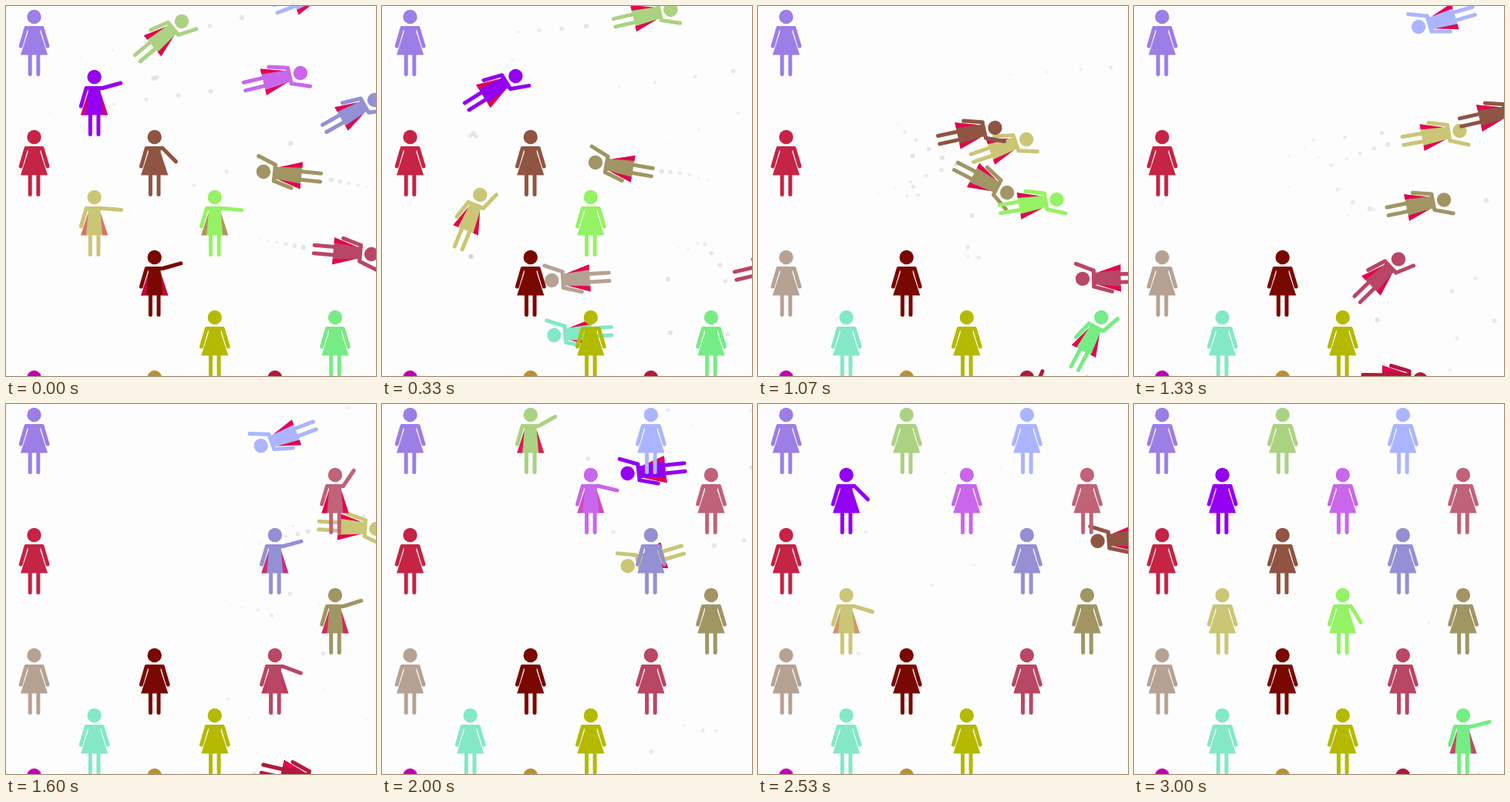
Recreate the animation shown at these times as an HTML page with a canvas. Size 480 by 480 pixels, loop 3070 ms.

```html
<!DOCTYPE html>
<html lang="en">
<head>
<meta charset="utf-8">
<title>Flying figures</title>
<style>
  html, body { margin: 0; width: 100%; height: 100%; overflow: hidden; background: #fefdfe; }
  canvas { display: block; width: 480px; height: 480px; }
</style>
</head>
<body>
<canvas id="stage" width="480" height="480"></canvas>
<script>
const ctx = document.getElementById('stage').getContext('2d');
const LOOP = 3070, STEPS = 46, STEP = LOOP / STEPS;
const RAISE = 350, LOWER = 300, PUFF_LIFE = 480;
const OUTSIDE = 590, EXIT_PACE = 1.6, ENTER_PACE = .9; // pace in ms per px
const LEAN = -6 * Math.PI / 180;

// Stands for leaving past the right edge and coming back from there.
const AWAY = 'away';
const at = (t, x, y) => ({ t, x, y });

// up: arm starts to rise; down: feet touch the ground; lift: arm height at the start;
// via: points the head passes between the two
const cast = [
  { color: '#9c7ee6' },
  { color: '#abd281', up: -540, down: 1920, via: [at(0, 228, 20), at(333, 374, 5), AWAY] },
  { color: '#abb5ff', down: 1700, via: [at(0, 420, -22), AWAY, at(1300, 385, 25), at(1600, 331, 54)] },

  { color: '#9300f2', up: -220, down: 2230, via: [at(333, 173, 91), AWAY, at(2000, 321, 90)] },
  { color: '#c966ec', down: 1830, via: [at(0, 382, 87), AWAY] },
  { color: '#c06278', down: 1576, via: [AWAY] },

  { color: '#c52444' },
  { color: '#8f5442', lift: .2, up: 430, down: 2690, via: [at(1067, 307, 158), AWAY, at(2533, 358, 176)] },
  { color: '#9390d4', down: 1490, via: [at(0, 478, 122), AWAY] },

  { color: '#cac675', up: -170, down: 2290, via: [at(333, 127, 245), at(1067, 348, 173), at(1600, 480, 162), at(1750, 455, 185), at(2000, 320, 210)] },
  { color: '#94f264', lift: .48, up: 420, down: 2736, via: [at(1067, 387, 251), AWAY] },
  { color: '#a09563', down: 1495, via: [at(0, 334, 215), at(333, 277, 203), at(700, 245, 190), at(1067, 323, 242)] },

  { color: '#b5a293', down: 650, via: [AWAY, at(333, 221, 356)] },
  { color: '#780800', lift: .63 },
  { color: '#b94664', down: 1414, via: [at(0, 474, 322), at(333, 531, 333), AWAY, at(1067, 422, 354)] },

  { color: '#83e8c5', down: 560, via: [AWAY, at(333, 224, 427)] },
  { color: '#b3ba00' },
  { color: '#76ec85', up: 560, down: 2890, via: [at(1067, 445, 404), AWAY] },

  { color: '#c300b8' },
  { color: '#b8922f' },
  { color: '#b3183c', up: 720, down: 2700, via: [at(1600, 405, 490), at(2000, 425, 507), AWAY] }
];

const clamp = v => Math.max(0, Math.min(1, v));
const smooth = v => (v = clamp(v), v * v * (3 - 2 * v));

// A point beyond the right edge, in line with home and the nearest visible point.
function outside(f, p, pace, rise) {
  return at(p.t + (OUTSIDE - p.x) * pace, OUTSIDE, p.y + (p.y - f.y) / 2 - rise);
}

function flightKeys(f) {
  const takeoff = f.up === undefined ? [] : [at(f.up + RAISE, f.x, f.y)];
  const stops = [...takeoff, ...f.via, at(f.down, f.x, f.y)];
  return stops.flatMap((p, i) => {
    if (p !== AWAY) return [p];
    const enter = outside(f, stops[i + 1], -ENTER_PACE, 0);
    return i ? [outside(f, stops[i - 1], EXIT_PACE, 25), enter] : [enter];
  });
}

// Three figures per row, odd rows shifted one column.
cast.forEach((f, i) => {
  const row = Math.floor(i / 3);
  f.x = 36.5 + 78.1 * (i % 3 * 2 + row % 2);
  f.y = 14 + 78 * row;
  if (f.via) f.keys = flightKeys(f);
});

// Speed at a key: at rest on the ground, else that of its neighbours.
function speed(f, i, axis) {
  const k = f.keys, end = k.length - 1;
  if (i === end || (i === 0 && f.up !== undefined)) return 0;
  const a = k[Math.max(0, i - 1)], b = k[i === end - 1 && i > 0 ? i : i + 1];
  return (b[axis] - a[axis]) / (b.t - a.t);
}

function along(f, t, axis) {
  const k = f.keys;
  if (t < k[0].t) return k[0][axis] + speed(f, 0, axis) * (t - k[0].t);
  let i = 0;
  while (i < k.length - 2 && t > k[i + 1].t) i++;
  const dt = k[i + 1].t - k[i].t, u = clamp((t - k[i].t) / dt), v = 1 - u;
  return v * v * (1 + 2 * u) * k[i][axis] + u * u * (3 - 2 * u) * k[i + 1][axis]
    + dt * u * v * (v * speed(f, i, axis) - u * speed(f, i + 1, axis));
}

function isFlying(f, t) {
  return !!f.keys && t < f.down && (f.up === undefined || t > f.up + RAISE);
}

function armLift(f, t) {
  const before = Math.max(0, (f.lift || 0) - t / LOWER);
  if (!f.keys) return before;
  const rise = f.up === undefined ? 1 : clamp((t - f.up) / RAISE);
  return Math.max(before, Math.min(rise, clamp(1 - (t - f.down) / LOWER)));
}

// In the air the head leads; near the ground the body swings upright.
function pose(f, t) {
  if (!isFlying(f, t)) return { x: f.x, y: f.y, turn: 0 };
  const move = axis => along(f, t + 2, axis) - along(f, t - 2, axis);
  const heading = Math.atan2(move('x'), -move('y')) + LEAN;
  const aloft = f.up === undefined ? 1 : smooth((t - f.up - RAISE - 80) / 190);
  const turn = heading * Math.min(aloft, smooth((f.down - t) / 110));
  return { x: along(f, t, 'x'), y: along(f, t, 'y'), turn };
}

function line(x1, y1, x2, y2) {
  ctx.beginPath();
  ctx.moveTo(x1, y1);
  ctx.lineTo(x2, y2);
  ctx.stroke();
}

function shape(...pts) {
  ctx.beginPath();
  pts.forEach(([x, y]) => ctx.lineTo(x, y));
  ctx.fill();
}

function disc(x, y, r) {
  ctx.beginPath();
  ctx.arc(x, y, r, 0, 7);
  ctx.fill();
}

function drawFigure(f, t) {
  const p = pose(f, t), lift = armLift(f, t);
  const angle = (-73.5 + 141.5 * lift) * Math.PI / 180;
  ctx.save();
  ctx.translate(p.x, p.y);
  ctx.rotate(p.turn);
  ctx.fillStyle = ctx.strokeStyle = f.color;
  ctx.lineCap = 'round';
  ctx.lineWidth = 5;
  disc(0, 0, 9.2);
  line(-10, 14.5, 10, 14.5);
  line(-10.5, 14.5, -17.3, 38);
  line(10.5, 14.5, 10.5 + 24.5 * Math.cos(angle), 14.5 - 24.5 * Math.sin(angle));
  shape([-8, 13], [8, 13], [8, 20], [17.6, 49.5], [-17.6, 49.5], [-8, 20]);
  for (const s of [-1, 1]) line(s * 5.3, 46, s * 5.3, 74.5);
  ctx.fillStyle = '#e4054f';
  ctx.globalAlpha = clamp((lift - .28) / .5);
  for (const s of [-1, 1]) shape([s * 8, 20], [s * 17.6, 49.5], [s * 10.5, 49.5]);
  ctx.restore();
}

// One puff per step is left at the feet, then shrinks and fades.
function drawTrail(f, t) {
  for (let age = STEP; age < PUFF_LIFE; age += STEP) {
    if (!isFlying(f, t - age)) continue;
    const p = pose(f, t - age), left = 1 - age / PUFF_LIFE;
    ctx.globalAlpha = .15 * Math.sqrt(left);
    disc(p.x - 77 * Math.sin(p.turn), p.y + 77 * Math.cos(p.turn), 1 + 2.5 * left);
  }
}

function draw(t) {
  ctx.globalAlpha = 1;
  ctx.fillStyle = '#fefdfe';
  ctx.fillRect(0, 0, 480, 480);
  ctx.fillStyle = '#55505c';
  cast.forEach(f => drawTrail(f, t));
  ctx.globalAlpha = 1;
  const order = cast.slice().reverse();
  order.filter(f => isFlying(f, t)).forEach(f => drawFigure(f, t));
  order.filter(f => !isFlying(f, t)).forEach(f => drawFigure(f, t));
}

// Steps fall on times rounded to 10 ms, hence the small lead.
const start = performance.now();
function tick() {
  const t = performance.now() - start + 5;
  draw(Math.floor(t / STEP) % STEPS * STEP);
  requestAnimationFrame(tick);
}
tick();
</script>
</body>
</html>
```
